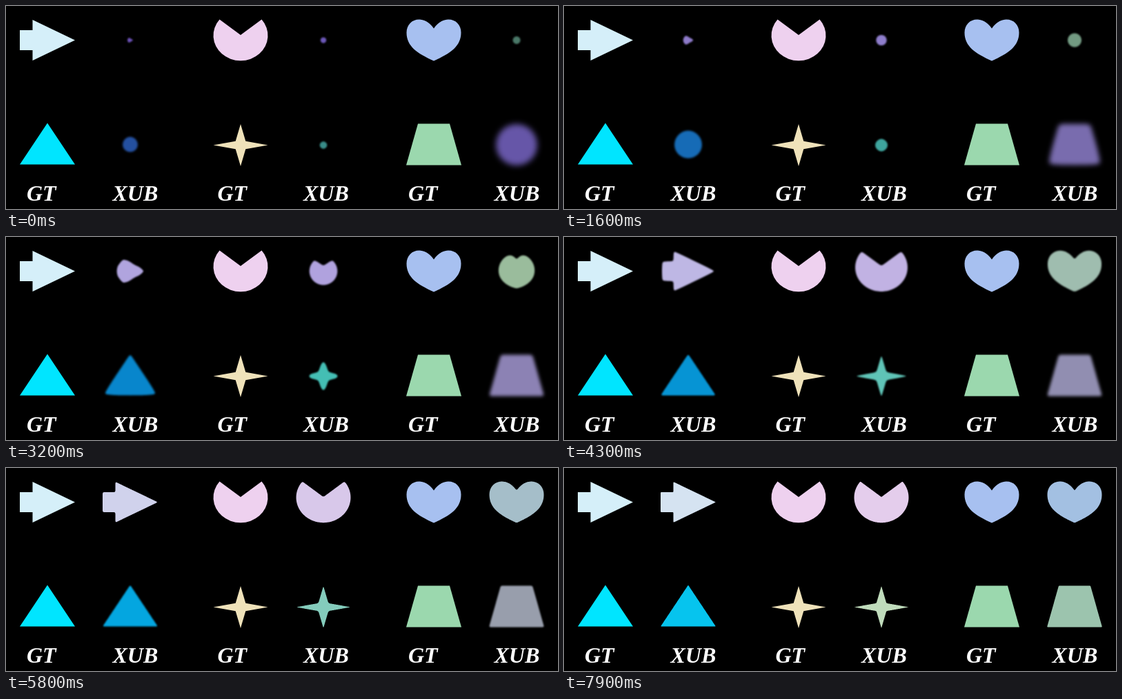
Recreate the animation shown at these times as an HTML page. Size 800 by 294 pixels, loop 8 s.

```html
<!DOCTYPE html>
<html lang="en">
<head>
<meta charset="utf-8">
<title>Shape fitting</title>
<style>
  html, body { margin: 0; width: 100%; height: 100%; overflow: hidden; background: #000; }
  svg { display: block; }
  text { font: italic bold 32px "Liberation Serif", "Times New Roman", serif; fill: #fff; }
</style>
</head>
<body>
<svg id="stage" width="800" height="294" viewBox="0 0 800 294"></svg>
<script>
const LOOP = 8000, STEP = 100, PHASE = 1600, SAMPLES = 240;
const COLOR_TIMES = [0, 3200, 5800, 7900];
const stage = document.getElementById('stage');

// Radius of the seed by direction: a disc, or a drop with its tip to the right.
const disc = () => 1;
const drop = a => Math.abs(a) < 2 * Math.PI / 3 ? 1 - .42 * Math.abs(Math.sin(1.5 * a)) : 1;

// start: first radius; pace: growth speed; forms: phase in which the seed takes on the goal's outline
const shapes = [
  {
    x: 60, y: 49.5, fill: '#d5eff9', start: 4, seed: drop,
    goal: 'M40 0L-21.5 29.5V14.5H-40V-14.5H-21.5V-29.5Z',
    colors: ['#6a50b4', '#b0a4de', '#d0d2ec', '#d5e3f1']
  },
  {
    x: 340, y: 49.5, fill: '#eed1ef', start: 4.2,
    goal: 'M0-7.5L-30.5-30A39.5 36.5 0 1 0 30.5-30Z',
    colors: ['#6c58b8', '#b0a2de', '#d8c8ea', '#e4cdec']
  },
  {
    x: 620, y: 49.5, fill: '#a7c0f0', start: 5.5,
    goal: 'M0-17C-7-27-15-30-21-30C-32-30-39.5-22-39.5-11C-39.5 9-24 19 0 30C24 19 39.5 9 39.5-11C39.5-22 32-30 21-30C15-30 7-27 0-17Z',
    colors: ['#4a7868', '#9abc9c', '#a5bec9', '#a3c0e2']
  },
  {
    x: 60, y: 200.5, fill: '#00e5ff', start: 11,
    goal: 'M0-31L40 29H-40Z',
    colors: ['#2450a0', '#0886cc', '#04a6e0', '#06c4ee']
  },
  {
    x: 340, y: 201.5, fill: '#efe2ba', start: 5.3, pace: .9,
    goal: 'M0-30.5L7.3-5.7L39.5 0L7.3 5.7L0 30.5L-7.3 5.7L-39.5 0L-7.3-5.7Z',
    colors: ['#388c88', '#44beb4', '#84ccbc', '#c0dcbc']
  },
  {
    x: 620, y: 201, fill: '#9bd8ae', start: 30, forms: 0,
    goal: 'M-23-30.5H23L40 29.5H-40Z',
    colors: ['#6656a8', '#8c82b4', '#989eac', '#9cc4ae']
  }
];

const mix = (a, b, u) => a + (b - a) * u;
const clamp = u => Math.min(1, Math.max(0, u));

function add(tag, attrs) {
  const node = document.createElementNS('http://www.w3.org/2000/svg', tag);
  for (const name in attrs) node.setAttribute(name, attrs[name]);
  return stage.appendChild(node);
}

function colorAt(rgb, t) {
  let i = 0;
  while (i < rgb.length - 2 && COLOR_TIMES[i + 1] <= t) i++;
  const u = clamp((t - COLOR_TIMES[i]) / (COLOR_TIMES[i + 1] - COLOR_TIMES[i]));
  return `rgb(${rgb[i].map((v, j) => Math.round(mix(v, rgb[i + 1][j], u)))})`;
}

// Goal points held back by the growing seed.
function grow({ start, pace = 1, forms = 1, seed = disc, points }, t) {
  const k = t / PHASE * pace;
  const reach = start * Math.exp(.41 * k + .19 * k * k);
  const form = clamp(t / PHASE - forms);
  return points.map(({ a, r }) => {
    const limit = reach * seed(a);
    const held = r * (1 + (r / limit) ** 6) ** (-1 / 6);
    const radius = mix(limit, held, form);
    return [radius * Math.cos(a), radius * Math.sin(a)];
  });
}

// Weighted average along the outline; reach is in samples.
function soften(points, reach) {
  const n = points.length, m = Math.floor(reach);
  return points.map((_, i) => {
    let x = 0, y = 0, sum = 0;
    for (let j = -m; j <= m; j++) {
      const w = 1 - Math.abs(j) / (reach + .01), p = points[(i + j + n) % n];
      x += w * p[0];
      y += w * p[1];
      sum += w;
    }
    return [x / sum, y / sum];
  });
}

for (const s of shapes) {
  const goal = add('path', { d: s.goal, fill: s.fill, transform: `translate(${s.x} ${s.y})` });
  s.gap = goal.getTotalLength() / SAMPLES;
  s.points = Array.from({ length: SAMPLES }, (_, i) => {
    const { x, y } = goal.getPointAtLength(i * s.gap);
    return { a: Math.atan2(y, x), r: Math.hypot(x, y) };
  });
  s.rgb = s.colors.map(c => [1, 3, 5].map(i => parseInt(c.slice(i, i + 2), 16)));
  s.node = add('path', { transform: `translate(${s.x + 120} ${s.y})` });
}
for (let i = 0; i < 3; i++) {
  const x = 30 + 276.5 * i;
  add('text', { x, y: 282 }).textContent = 'GT';
  add('text', { x: x + 124.5, y: 282 }).textContent = 'XUB';
}

function draw(now) {
  const t = Math.floor(now % LOOP / STEP) * STEP;
  for (const s of shapes) {
    const outline = soften(grow(s, t), mix(9, 2, t / LOOP) / s.gap);
    const blur = .4 + .13 * s.start * clamp(1 - t / 6400) + .4 * Math.sin(Math.PI * t / LOOP);
    s.node.setAttribute('d', 'M' + outline.map(p => p.map(v => v.toFixed(2)).join(' ')).join('L') + 'Z');
    s.node.setAttribute('fill', colorAt(s.rgb, t));
    s.node.style.filter = `blur(${blur}px)`;
  }
}

function tick() {
  draw(performance.now());
  requestAnimationFrame(tick);
}
tick();
</script>
</body>
</html>
```
